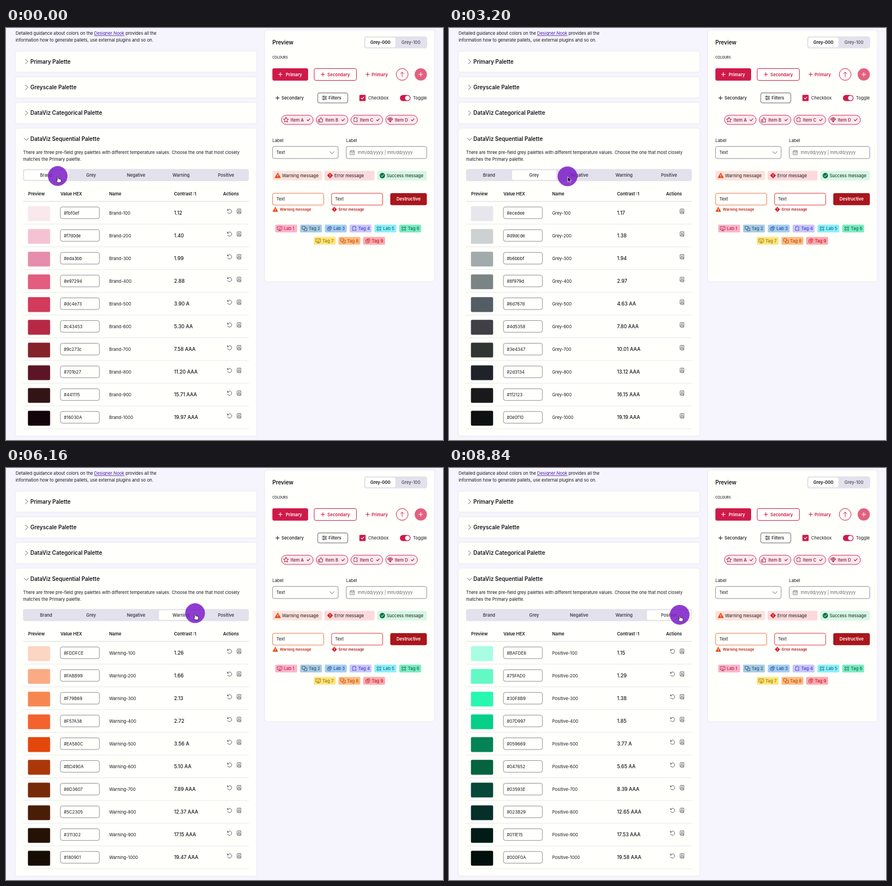
An HTML page for the animation above (9440 ms loop, 771 by 726 pixels).

```html
<!DOCTYPE html>
<html lang="en">
<head>
<meta charset="utf-8">
<title>Palette editor</title>
<style>
html, body { margin: 0; width: 100%; height: 100%; overflow: hidden; background: #f6f5fd; }
svg { display: block; font-family: Inter, "Open Sans", sans-serif; }
.card { fill: #fffffc; filter: drop-shadow(0 .5px 1.2px rgba(40, 30, 80, .13)); }
text { white-space: pre; }
</style>
</head>
<body>
<svg id="stage" width="771" height="726" viewBox="0 0 771 726"></svg>
<script>
const LOOP = 9440, STEP = 40, BODY = 7.6, HEAD = 9.65;
const INK = '#17171c', RED = '#cf1a49', GREY = '#55555c', BAR = '#e2e1ec', RULE = '#e3e2e6';

const palettes = [
  { name: 'Brand',
    hex: '#fbf0ef #f7d0de #eda3bb #e97294 #dc4e73 #c43453 #9c273c #701b27 #441115 #16030A',
    contrast: '1.12,1.40,1.99,2.88,3.90 A,5.30 AA,7.58 AAA,11.20 AAA,15.71 AAA,19.97 AAA',
    fill: 'f9e9ec f5c2d4 e68dac e25d7f d23b5b b72845 86212b 5c1525 331416 12030a' },
  { name: 'Grey',
    hex: '#ecedee #d9dcde #b6bbbf #8f979d #6d767d #4d5358 #3e4347 #2d3134 #1f2123 #0e0f10',
    contrast: '1.17,1.38,1.94,2.97,4.63 AA,7.80 AAA,10.01 AAA,13.12 AAA,16.15 AAA,19.19 AAA',
    fill: 'e6e6ec ccd1d2 a2abab 7a8484 555d64 403f45 303534 202229 19191b 0f1011' },
  { name: 'Negative',
    hex: '#F8D3D3 #F1A7A7 #EA7B7B #E34F4F #DC2626 #B01C1C #841515 #580E0E #2C0707 #160404',
    contrast: '1.38,1.94,2.76,3.82 A,4.83 AA,6.93 AA,10.00 AAA,14.15 AAA,18.41 AAA,19.94 AAA',
    fill: 'f5c4c4 ee9192 e36565 dc3d3c d31c1c 9b1919 6c1413 45110b 210a0c 12030a' },
  { name: 'Warning',
    hex: '#FDDFCE #FABB99 #F79B69 #F57A38 #EA580C #BD490A #8D3607 #5C2305 #311302 #180901',
    contrast: '1.26,1.66,2.13,2.72,3.56 A,5.10 AA,7.89 AAA,12.37 AAA,17.15 AAA,19.47 AAA',
    fill: 'fdd5c3 faaa85 f78752 f3632d e4470c ab380a 772a07 4a1d07 251205 150d04' },
  { name: 'Positive',
    hex: '#BAFDE8 #75FAD0 #30F8B9 #07D997 #059669 #047652 #03593E #023B29 #011E15 #000F0A',
    contrast: '1.15,1.29,1.38,1.85,3.77 A,5.65 AA,8.39 AAA,12.65 AAA,17.53 AAA,19.58 AAA',
    fill: 'a9fde2 62f9c6 28f7ae 06cf88 068355 05633f 06483a 052f28 031b16 010f0c' }
];

// y is the vertical middle of the capitals
const text = (x, y, s, { size = BODY, weight = 400, fill = INK, mid = false } = {}) =>
  `<text x="${x}" y="${y + size * .364}" font-size="${size}" font-weight="${weight}" fill="${fill}"${mid ? ' text-anchor="middle"' : ''}>${s}</text>`;
const box = (x1, y1, x2, y2, r, fill, stroke = 'none', attrs = '') =>
  `<rect x="${x1}" y="${y1}" width="${x2 - x1}" height="${y2 - y1}" rx="${r}" fill="${fill}" stroke="${stroke}" ${attrs}/>`;
const disc = (x, y, r, fill, stroke = 'none') =>
  `<circle cx="${x}" cy="${y}" r="${r}" fill="${fill}" stroke="${stroke}"/>`;
const line = (x, y, d, stroke = INK, w = .9, fill = 'none') =>
  `<path transform="translate(${x} ${y})" d="${d}" fill="${fill}" stroke="${stroke}" stroke-width="${w}" stroke-linecap="round" stroke-linejoin="round"/>`;
const card = (x1, y1, x2, y2) => box(x1, y1, x2, y2, 4, '#fffffc', 'none', 'class="card"');

const icon = {
  plus: 'M-3.2 0H3.2M0-3.2V3.2',
  tick: 'M-2.4 0L-.7 1.8 2.5-1.7',
  star: 'M0-4.4L1.3-1.5 4.4-1.2 2.1.9 2.8 4 0 2.4-2.8 4-2.1.9-4.4-1.2-1.3-1.5Z',
  thumb: 'M-4 0H-2V4H-4ZM-2 0L0-4.2C1.4-4.2 1.4-3 .9-1.2H3.6L3 4H-2',
  puzzle: 'M-2.6-3.2H-1A1.2 1.2 0 0 1 1.4-3.2H3V-1A1.2 1.2 0 0 0 3 1.2V3.4H1.2A1.2 1.2 0 0 0-1 3.4H-2.6V1.2A1.2 1.2 0 0 1-2.6-1Z',
  gem: 'M-2.5-3.6H2.5L4.3-1 0 4-4.3-1ZM-4.3-1H4.3M-1.5-1L0 4 1.5-1 0-3.6Z',
  board: 'M-4-3.5H4V2H-4ZM-2-1L-.5.5 2-2M0 2V3.8M-2 3.8H2',
  copies: 'M-4-3.8H1V1H-4ZM1-1.2H4V3.8H-1V1',
  pie: 'M-.8-3A3.4 3.4 0 1 0 3 1H-.8ZM1-4A3.4 3.4 0 0 1 4-1H1Z',
  nodes: 'M-3.5-2A1.4 1.4 0 1 1-.7-2 1.4 1.4 0 1 1-3.5-2M.9-2A1.4 1.4 0 1 1 3.7-2 1.4 1.4 0 1 1 .9-2M-3.5 2.2A1.4 1.4 0 1 1-.7 2.2 1.4 1.4 0 1 1-3.5 2.2M.9 2.2H3.7M2.3.8V3.6',
  refresh: 'M-3.7-3.7V-1.4H-1.4M-3.4-1.6A3.8 3.8 0 1 1-3.5 1.6',
  book: 'M-3.2 2.4V-3A1 1 0 0 1-2.2-4H3.2V4H-2.2A1.3 1.3 0 0 1-2.2 1.8H3.2M0-2.3V.2M-1-.9L0 .2 1-.9'
};
const alertSign = (x, y, k = 1) =>
  `<g transform="translate(${x} ${y}) scale(${k})">${line(0, 0, 'M0-4.3L4.7 3.9H-4.7Z', '#e8490f', 1, '#e8490f')}${line(0, 0, 'M0-1.4V1M0 2.6V2.7', '#fff', 1)}</g>`;
const errorSign = (x, y, k = 1) =>
  `<g transform="translate(${x} ${y}) scale(${k})">${line(0, 0, 'M0-4.5L4.5 0 0 4.5-4.5 0Z', '#d3191f', 1, '#d3191f')}${line(0, 0, 'M0-2.2V.5M0 2.2V2.3', '#fff', 1)}</g>`;

const tabX = i => 31.8 + 79.35 * i;
const rowY = i => 325.6 + 40.05 * i;

function leftSide() {
  let s = text(17, 9.5, 'Detailed guidance about colors on the <tspan fill="#4a1aa6" text-decoration="underline">Designer Nook</tspan> provides all the')
    + text(17, 21.5, 'information how to generate pallets, use external plugins and so on.');
  ['Primary', 'Greyscale', 'DataViz Categorical'].forEach((name, i) => {
    const y = 59.2 + 45.3 * i;
    s += card(17, y - 18, 442, y + 18.3) + line(36.5, y, 'M-2.2-4L2 0-2.2 4', GREY)
      + text(43, y, name + ' Palette', { size: HEAD, weight: 600 });
  });
  s += card(17, 177, 442, 718.5) + line(36, 196, 'M-4-2L0 2 4-2', GREY)
    + text(43, 195.2, 'DataViz Sequential Palette', { size: HEAD, weight: 600 })
    + text(30, 219.3, 'There are three pre-field grey palettes with different temperature values. Choose the one that most closely')
    + text(30, 231.2, 'matches the Primary palette.')
    + box(30, 248.5, 428.5, 269.7, 4, BAR);
  palettes.forEach((p, i) => s += box(tabX(i), 250.5, tabX(i) + 78, 267.7, 3, '#fffffc', 'none', 'class="pill"'));
  palettes.forEach((p, i) => s += text(tabX(i) + 39, 259, p.name, { weight: 500, mid: true, fill: '#2c2c34' }));
  [[39, 'Preview'], [96, 'Value HEX'], [182, 'Name'], [296.5, 'Contrast :1'], [383, 'Actions']]
    .forEach(([x, h]) => s += text(x, 292.7, h, { weight: 600 }));
  for (let i = 0; i <= 10; i++) s += box(30, 305.2 + 40.05 * i, 428.5, 306 + 40.05 * i, 0, i ? RULE : '#d2d1d8');
  return s + '<g id="table"></g><g id="swatches"></g>';
}

function rightSide() {
  const bold = { weight: 600 };
  let s = card(457, 4, 755.5, 446.5)
    + text(470, 25.5, 'Preview', { size: HEAD, weight: 600 })
    + box(632, 14.7, 743, 36, 4.5, BAR) + box(634, 16.7, 687, 34, 3.5, '#fffffc')
    + text(660.5, 25.2, 'Grey-000', { weight: 600, mid: true })
    + text(714.5, 25.2, 'Grey-100', { weight: 500, mid: true, fill: '#4a4a55' })
    + text(470, 52, 'COLOURS', { size: 5.6, weight: 600, fill: '#3a3a42' });

  s += box(470, 71, 533, 92.7, 3, RED) + line(484, 81.8, icon.plus, '#fff', 1.1)
    + text(493.5, 81.8, 'Primary', { weight: 600, fill: '#fff' })
    + box(543.8, 71.4, 618.3, 92.4, 3, 'none', RED) + line(559, 81.8, icon.plus, RED, 1.1)
    + text(567, 81.8, 'Secondary', { weight: 600, fill: RED })
    + line(638, 81.8, icon.plus, RED, 1.1) + text(645, 81.8, 'Primary', { weight: 600, fill: RED })
    + disc(699, 81.8, 10.4, '#fffffc', RED) + line(699, 81.8, 'M0 4V-4M-3.2-1L0-4 3.2-1', RED)
    + disc(731.8, 81.8, 10.8, '#e2607f') + line(731.8, 81.8, icon.plus, '#fff', 1.1);

  s += line(479, 123.3, icon.plus, INK, 1) + text(486, 123.3, 'Secondary', { weight: 500 })
    + box(550, 114.4, 603, 132, 3, 'none', GREY, 'stroke-width=".9"')
    + line(562, 123.2, 'M-4-2.7H4M-4 0H4M-4 2.7H4M-1.5-3.7V-1.7M1.7-1V1M-1.5 1.7V3.7', INK, .8)
    + text(569, 123.3, 'Filters', { weight: 500 })
    + box(623.5, 117.8, 634.5, 128.8, 1.5, RED) + line(629, 123.3, icon.tick, '#fff', 1.1)
    + text(639, 123.3, 'Checkbox')
    + box(695, 118, 713.7, 128.8, 5.4, RED) + disc(708.3, 123.4, 4.2, '#fff')
    + text(718, 123.3, 'Toggle');

  ['star', 'thumb', 'puzzle', 'gem'].forEach((k, i) => {
    const x = 486 + 61.3 * i;
    s += box(x, 153.7, x + 56, 170, 8.1, '#faeaef', RED, 'stroke-width=".9"') + line(x + 8, 161.8, icon[k], '#a3143c', .9)
      + text(x + 16, 161.8, 'Item ' + 'ABCD'[i], { weight: 500, fill: '#8a1538' }) + line(x + 47.5, 161.8, icon.tick, '#a3143c', 1.1);
  });

  const field = (x1, x2, y1, y2, c = '#85858c') => box(x1, y1, x2, y2, 3, '#fffffc', c, 'stroke-width=".9"');
  s += text(470, 198.5, 'Label') + text(600, 198.5, 'Label')
    + field(470.3, 586, 208.7, 230) + text(477, 219.5, 'Text') + line(575, 219.5, 'M-3.8-1.8L0 2 3.8-1.8', GREY)
    + field(600.3, 742.3, 208.7, 230) + line(611, 219.5, 'M-3.6-3H3.6V3.8H-3.6ZM-3.6-.8H3.6M-1.7-4V-2M1.7-4V-2M-1.5 1.5H1.5', '#77777e', .8)
    + text(620.5, 219.5, 'mm/dd/yyyy | mm/dd/yyyy', { fill: '#66666e' });

  s += box(470, 251.8, 557.5, 268.6, 2, '#fde2dd') + alertSign(479.6, 260)
    + box(562, 251.8, 650, 268.6, 2, '#fcdadb') + errorSign(571.8, 260)
    + box(655, 251.8, 742.4, 268.6, 2, '#d6f7e3') + disc(664, 260.1, 4.8, '#0b7345') + line(664, 260.1, icon.tick, '#fff', 1);
  ['Warning', 'Error', 'Success'].forEach((m, i) => s += text(487 + 92.2 * i, 260.2, m + ' message'));

  s += field(470.4, 560.6, 291.2, 312, '#ef6a3c') + text(477, 301.7, 'Text')
    + field(574.4, 664.6, 291.2, 312, '#d8272d') + text(580.5, 301.7, 'Text')
    + box(678, 291, 742.5, 312.3, 3, '#a9161c') + text(710.2, 301.7, 'Destructive', { weight: 600, fill: '#fff', mid: true })
    + alertSign(475.3, 319.8, .9) + text(483, 319.8, 'Warning message', { size: 6.4, weight: 600, fill: '#bd2410' })
    + errorSign(579.4, 319.8, .9) + text(587, 319.8, 'Error message', { size: 6.4, weight: 600, fill: '#b3151c' });

  [['Lab 1', 'board', '#f9b6cb', '#c81c50'], ['Tag 2', 'copies', '#a9cbe3', '#2b5a78'], ['Lab 3', 'pie', '#a6cdf0', '#1c4c98'],
   ['Tag 4', 'puzzle', '#c9c7fa', '#473ccb'], ['Lab 5', 'nodes', '#8eeef8', '#0b7587'], ['Tag 6', 'nodes', '#7debc2', '#0a7153'],
   ['Tag 7', 'board', '#fde57a', '#9c7508'], ['Tag 8', 'copies', '#fdbb80', '#bd4d0d'], ['Tag 9', 'pie', '#fba8ae', '#c61f2c']]
    .forEach(([label, k, bg, ink], i) => {
      const x = i < 6 ? 475 + 43.75 * i : 543 + 43.6 * (i - 6), y = i < 6 ? 353.4 : 375;
      s += box(x, y - 6.8, x + 38.6, y + 6.8, 2, bg) + line(x + 8, y, icon[k], ink, .85)
        + text(x + 15.2, y, label, { weight: 500, fill: ink });
    });
  return s;
}

const pointer = `<g id="pointer">
  <circle r="17.2" fill="#7f1fcb" fill-opacity=".87" stroke="#7a2fb8" stroke-opacity=".5" stroke-width=".8"/>
  <path id="arrow" d="M.3.5V10L2.5 8 4 11.2 5.6 10.5 4.2 7.4H7.2Z" fill="#111" stroke="#fff" stroke-width=".7"/>
  <path id="hand" d="M-.8 2.4Q.2 1.2 1.1 2.4V5Q2.3 4.4 2.9 5.4 4 4.9 4.6 5.9 5.8 5.6 5.9 6.9V9Q5.6 10.2 5 11.8H.3L-2.6 8.2Q-2.7 6.8-.8 7.8Z" fill="#fff" stroke="#111" stroke-width=".8"/>
</g>`;

const stage = document.getElementById('stage');
stage.innerHTML = leftSide() + rightSide() + pointer;
const $ = id => document.getElementById(id);
const pills = [...stage.querySelectorAll('.pill')];

function tableRows(p, n) {
  const hex = p.hex.split(' '), ratio = p.contrast.split(',');
  return hex.map((h, i) => {
    const y = rowY(i);
    return box(96, y - 10.3, 164.8, y + 10.3, 3.5, '#fffffc', '#85858c', 'stroke-width=".9"')
      + text(102, y + .2, h) + text(182, y + .2, `${p.name}-${i + 1}00`)
      + text(296.5, y, ratio[i], { size: 8.65, weight: 500 })
      + (n === 1 ? '' : line(394.3, y - 2.6, icon.refresh, GREY, .9)) + line(411, y - 2.6, icon.book, GREY, .9);
  }).join('');
}
const swatchRows = p => p.fill.split(' ')
  .map((c, i) => box(38.7, rowY(i) - 11.5, 77.8, rowY(i) + 14.6, 2, '#' + c)).join('');

// moves: start, end, from x y, to x y; the drift keeps the hand
const moves = [
  { t0: 240, t1: 1160, a: [91.3, 260.8], b: [168, 261.2] },
  { t0: 2920, t1: 3480, a: [168, 261.2], b: [250.2, 261.5] },
  { t0: 5280, t1: 5840, a: [250.2, 261.5], b: [333.6, 255.8] },
  { t0: 6400, t1: 6560, a: [333.6, 255.8], b: [333.2, 257.5], drift: true },
  { t0: 7480, t1: 8160, a: [333.2, 257.5], b: [407, 258.7] }
];
const clicks = [0, 1640, 3960, 6080, 8640];
const handEnds = [240, 2400, 4880, 7160, LOOP];
const smooth = u => u * u * (3 - 2 * u);
const travels = moves.filter(m => !m.drift);
const hoverAt = m => m.t0 + .8 * (m.t1 - m.t0);

let shown = -1;
function draw(t) {
  let [x, y] = moves[0].a;
  for (const { t0, t1, a, b } of moves) {
    if (t < t0) break;
    const u = smooth(Math.min(1, (t - t0) / (t1 - t0)));
    x = a[0] + (b[0] - a[0]) * u;
    y = a[1] + (b[1] - a[1]) * u;
  }
  const tab = clicks.filter(c => t >= c).length - 1;
  const over = travels.filter(m => t >= hoverAt(m)).length;
  const hand = t <= handEnds[over] - (over && over < 4 ? 1 : 0);
  $('pointer').setAttribute('transform', `translate(${x.toFixed(2)} ${y.toFixed(2)})`);
  $('hand').style.display = hand ? '' : 'none';
  $('arrow').style.display = hand ? 'none' : '';
  pills.forEach((p, i) => p.style.display = i === tab || i === over ? '' : 'none');
  if (tab !== shown) {
    $('table').innerHTML = tableRows(palettes[tab], tab);
    $('swatches').innerHTML = swatchRows(palettes[tab]);
    shown = tab;
  }
  // swatches arrive one step after the rows
  $('swatches').style.display = tab && t < clicks[tab] + STEP ? 'none' : '';
}

const begin = performance.now();
function tick() {
  const t = (performance.now() - begin) % LOOP;
  draw(Math.floor(t / STEP) * STEP);
  requestAnimationFrame(tick);
}
tick();
</script>
</body>
</html>
```
